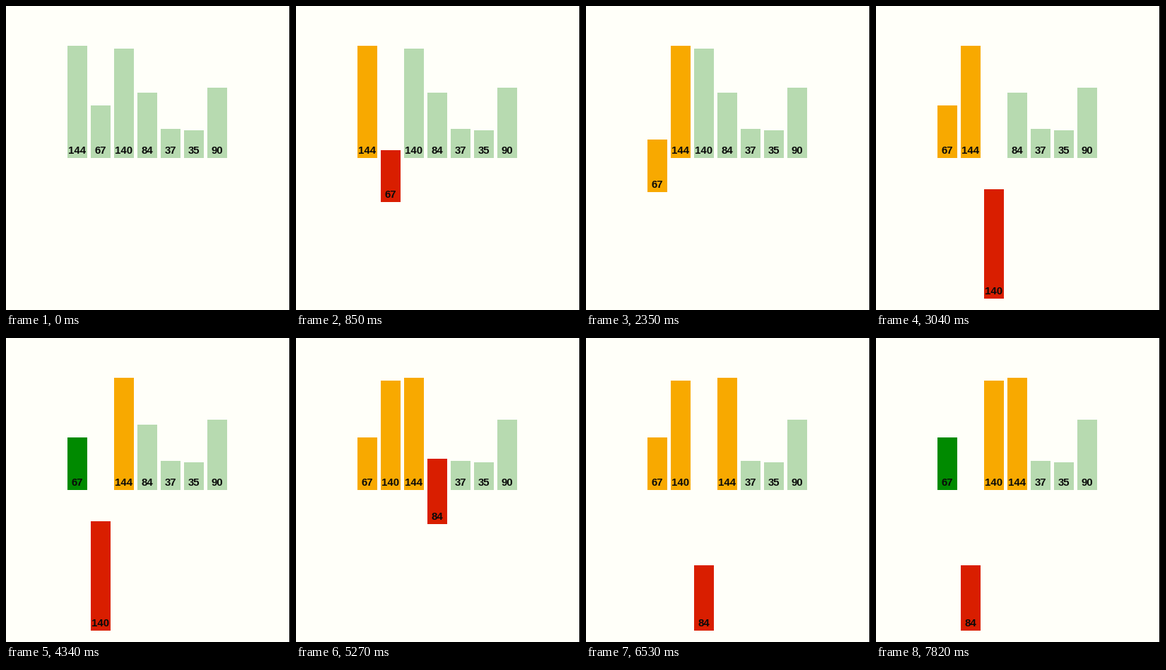
Write a matplotlib script that moves like this. It is 402 px wide and 428 px high and loops after 8000 ms.

```python
import matplotlib.pyplot as plt
from matplotlib.animation import FuncAnimation
from matplotlib.patches import Rectangle

W, H, DPI = 402, 428, 100
LOOP_MS, STEP_MS = 8000, 20
VALUES = [144, 67, 140, 84, 37, 35, 90]

LEFT, PITCH, BAR_W = 87, 33, 28
BASE, DROP, SCALE = 214, 198, 1.1
LABEL_RISE = 6.5
MOVE_MS, LEAD_MS = 280, 60

PAPER, IDLE = "#fffff9", "#b7dab0"
SORTED, COMPARED, PICKED = "#f8a900", "#008a00", "#d91e00"

# Insertion sort steps: time, then (value, slot, lowered, colour) per bar.
STEPS = [
    (240, [(144, 0, 0, SORTED)]),
    (780, [(67, 1, 1, PICKED)]),
    (1260, [(144, 0, 0, COMPARED)]),
    (1740, [(144, 1, 0, SORTED), (67, 0, 1, PICKED)]),
    (2230, [(67, 0, 0, SORTED)]),
    (2740, [(140, 2, 1, PICKED)]),
    (3240, [(144, 1, 0, COMPARED)]),
    (3730, [(144, 2, 0, SORTED), (140, 1, 1, PICKED)]),
    (4260, [(67, 0, 0, COMPARED)]),
    (4740, [(67, 0, 0, SORTED), (140, 1, 0, SORTED)]),
    (5210, [(84, 3, 1, PICKED)]),
    (5720, [(144, 2, 0, COMPARED)]),
    (6260, [(144, 3, 0, SORTED), (84, 2, 1, PICKED)]),
    (6730, [(140, 1, 0, COMPARED)]),
    (7260, [(140, 2, 0, SORTED), (84, 1, 1, PICKED)]),
    (7740, [(67, 0, 0, COMPARED)]),
]


def ease(u):
    """Cubic in-out on the clamped progress."""
    u = min(max(u, 0), 1)
    return 4 * u**3 if u < 0.5 else 1 - 4 * (1 - u) ** 3


def state_at(t):
    state = {v: (i, 0, IDLE) for i, v in enumerate(VALUES)}
    for start, changes in STEPS:
        if t < start:
            break
        p = ease((t - start + LEAD_MS) / MOVE_MS)
        for value, slot, low, color in changes:
            old_slot, old_low, _ = state[value]
            state[value] = (old_slot + (slot - old_slot) * p,
                            old_low + (low - old_low) * p, color)
    return state


# The small margin keeps the pixel size from being rounded down.
fig = plt.figure(figsize=((W + 0.01) / DPI, (H + 0.01) / DPI),
                 dpi=DPI, facecolor=PAPER)
ax = fig.add_axes([0, 0, 1, 1])
ax.set_xlim(0, W)
ax.set_ylim(H, 0)
ax.axis("off")
ax.add_patch(Rectangle((W - 1, 0), 1, H, color="black", lw=0))

bars, labels = {}, {}
for value in VALUES:
    bars[value] = ax.add_patch(
        Rectangle((0, 0), BAR_W, -value * SCALE, lw=0))
    labels[value] = ax.text(
        0, 0, str(value), ha="center", va="baseline", color="#0a0a0a",
        family="Liberation Sans", weight="bold", size=15 * 72 / DPI)


def update(frame):
    for value, (slot, low, color) in state_at(frame * STEP_MS).items():
        x, y = LEFT + PITCH * slot, BASE + DROP * low
        bars[value].set_xy((x, y))
        bars[value].set_facecolor(color)
        labels[value].set_position((x + BAR_W / 2, y - LABEL_RISE))
    return [*bars.values(), *labels.values()]


anim = FuncAnimation(fig, update, frames=LOOP_MS // STEP_MS,
                     interval=STEP_MS, repeat=True, repeat_delay=0)
plt.show()
```
